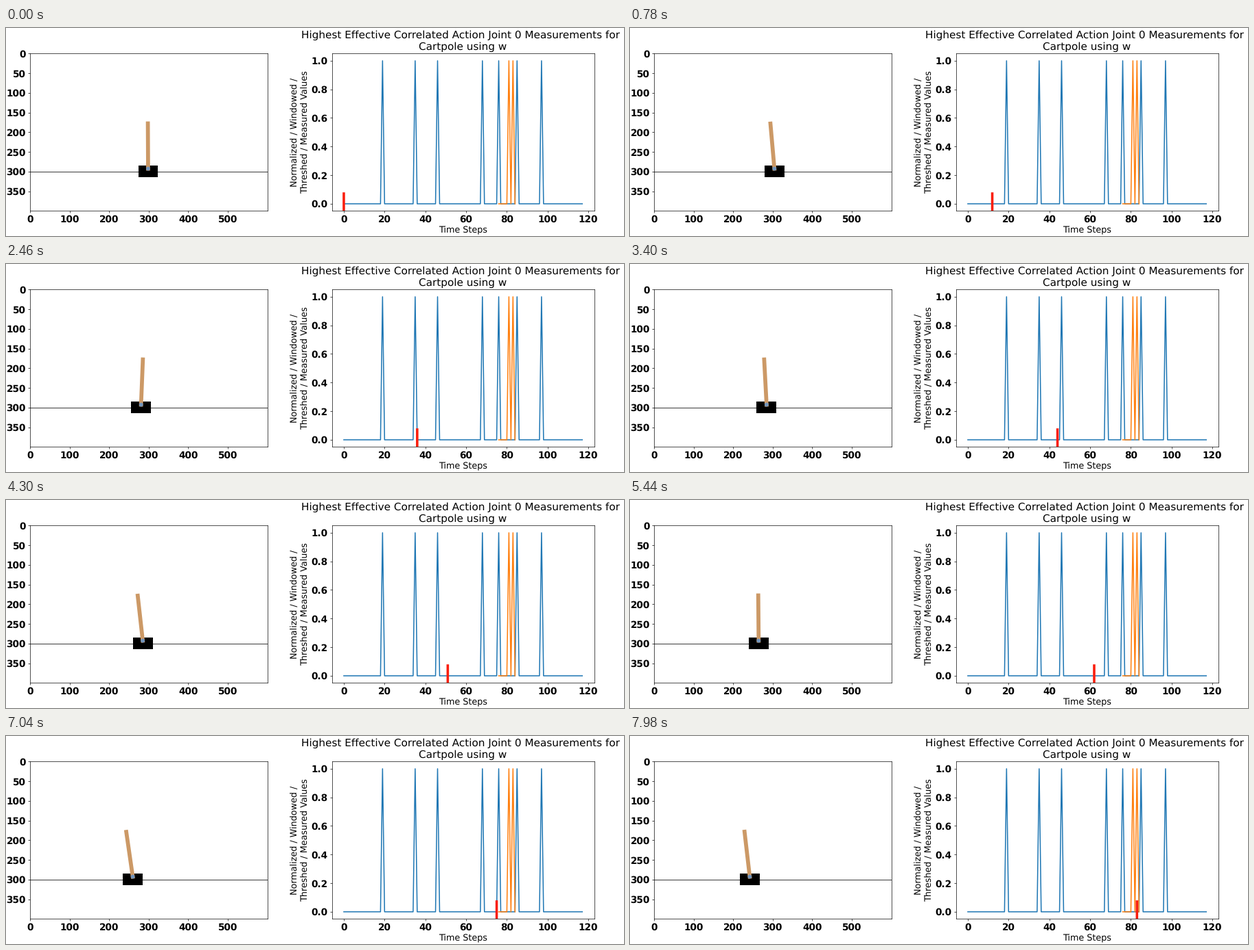
Recreate the animation shown at these times as a matplotlib script. Size 900 by 304 pixels, loop 8 s.

```python
import numpy as np
import matplotlib.pyplot as plt
from matplotlib.animation import FuncAnimation
from matplotlib.patches import Circle, Polygon, Rectangle

W, H, DPI = 900, 304, 100
FRAMES, INTERVAL = 400, 20
PT = 0.853 * 72 / DPI  # points per nominal point after down-scaling
TITLE, LABEL, TICK = 17.9 * PT, 15 * PT, 16 * PT

plt.rcParams.update({
    "font.family": "DejaVu Sans",
    "font.weight": "bold",
    "text.hinting": "none",
    "axes.labelweight": "normal",
    "axes.titleweight": "normal",
    "axes.titlesize": TITLE,
    "axes.titlepad": 6 * PT,
    "axes.labelsize": LABEL,
    "axes.labelpad": 2.4 * PT,
    "axes.linewidth": 0.8 * PT,
    "lines.linewidth": 1.8 * PT,
    "xtick.labelsize": TICK, "ytick.labelsize": TICK,
    "xtick.major.size": 3.5 * PT, "ytick.major.size": 3.5 * PT,
    "xtick.major.width": 0.8 * PT, "ytick.major.width": 0.8 * PT,
    "xtick.major.pad": 3.5 * PT, "ytick.major.pad": 3.5 * PT,
})


def spline(xs, ys):
    """Natural cubic spline through the given points."""
    xs, ys = np.array(xs, float), np.array(ys, float)
    n, h = len(xs), np.diff(xs)
    a, b = np.eye(n), np.zeros(n)
    for i in range(1, n - 1):
        a[i, i - 1:i + 2] = h[i - 1], 2 * (h[i - 1] + h[i]), h[i]
        b[i] = 6 * ((ys[i + 1] - ys[i]) / h[i] - (ys[i] - ys[i - 1]) / h[i - 1])
    m = np.linalg.solve(a, b)

    def at(x):
        i = int(np.clip(np.searchsorted(xs, x) - 1, 0, n - 2))
        u, v, d = xs[i + 1] - x, x - xs[i], h[i]
        return ((m[i] * u**3 + m[i + 1] * v**3) / (6 * d)
                + (ys[i] / d - m[i] * d / 6) * u
                + (ys[i + 1] / d - m[i + 1] * d / 6) * v)
    return at


# Playback slows down along the way, so frames map to steps piecewise.
KEY_FRAMES = [0, 73, 123, 215, 272, 352, 399]
KEY_STEPS = [0, 23, 36, 51, 62, 75, 83]
CART = np.array([298.5, 298.5, 280.7, 285, 264.5, 259.7, 242])
LEAN = np.array([-0.005, -0.066, 0.04, -0.111, -0.009, -0.143, -0.115])

# The pole's centre of percussion drifts smoothly while the cart swings under it.
PERCUSSION = 125 * 2 / 3
lean_at = spline(KEY_STEPS, LEAN)
drift_at = spline(KEY_STEPS, CART + PERCUSSION * LEAN)


def add_axes(x, y, w, h):
    return fig.add_axes([x / W, 1 - (y + h) / H, w / W, h / H])


def pulses(steps, peaks):
    return np.isin(steps, peaks).astype(float)


fig = plt.figure(figsize=(W / DPI, H / DPI), dpi=DPI, facecolor="white")

# Cart-pole view
view = add_axes(35, 37.4, 345.6, 230)
view.set(xlim=(0, 600), ylim=(400, 0),
         xticks=range(0, 600, 100), yticks=range(0, 400, 50))
cart = view.add_patch(Rectangle((0, 285), 50, 29.5, fc="black", lw=0, zorder=2))
view.plot([0, 600], [300, 300], color="black", lw=0.9 * PT, zorder=2.1)
pole = view.add_patch(Polygon(np.zeros((4, 2)), fc=(0.8, 0.6, 0.4), lw=0, zorder=3))
axle = view.add_patch(Circle((0, 292.5), 5, fc=(0.44, 0.58, 0.74), lw=0, zorder=4))

# Measurement plot
chart = add_axes(474.6, 37.4, 382, 230)
steps = np.arange(118)
chart.plot(steps, pulses(steps, [19, 35, 46, 68, 76, 85, 97]), color="C0")
late = np.arange(76, 85)
chart.plot(late, pulses(late, [81, 83]), color="C1")
chart.set(xlim=(-5.85, 122.85), ylim=(-0.05, 1.05),
          xticks=range(0, 121, 20), yticks=np.arange(6) / 5)
chart.set_xlabel("Time Steps")
chart.set_ylabel("Normalized / Windowed /\nThreshed / Measured Values")
chart.set_title("Cartpole using w")
fig.text(662.3 / W, 1 - 14.8 / H,
         "Highest Effective Correlated Action Joint 0 Measurements for",
         ha="center", va="baseline", size=TITLE, weight="normal")
marker, = chart.plot([0, 0], [-0.05, 0.08], color="#fa1e0e", lw=4.2 * PT,
                     solid_capstyle="butt", snap=False, zorder=5)


def draw(frame):
    step = round(float(np.interp(frame, KEY_FRAMES, KEY_STEPS)))
    lean = lean_at(step)
    x = drift_at(step) - PERCUSSION * lean
    cart.set_x(x - 25)
    axle.center = (x, 292.5)
    up = np.array([np.sin(lean), -np.cos(lean)])
    side = np.array([np.cos(lean), np.sin(lean)])
    pivot = np.array([x, 292.5])
    pole.set_xy([pivot + s * side + t * up
                 for s, t in ((-5, -5), (-5, 120), (5, 120), (5, -5))])
    marker.set_xdata([step, step])
    return cart, pole, axle, marker


anim = FuncAnimation(fig, draw, frames=FRAMES, interval=INTERVAL,
                     repeat=True, repeat_delay=0, blit=False)
plt.show()
```
